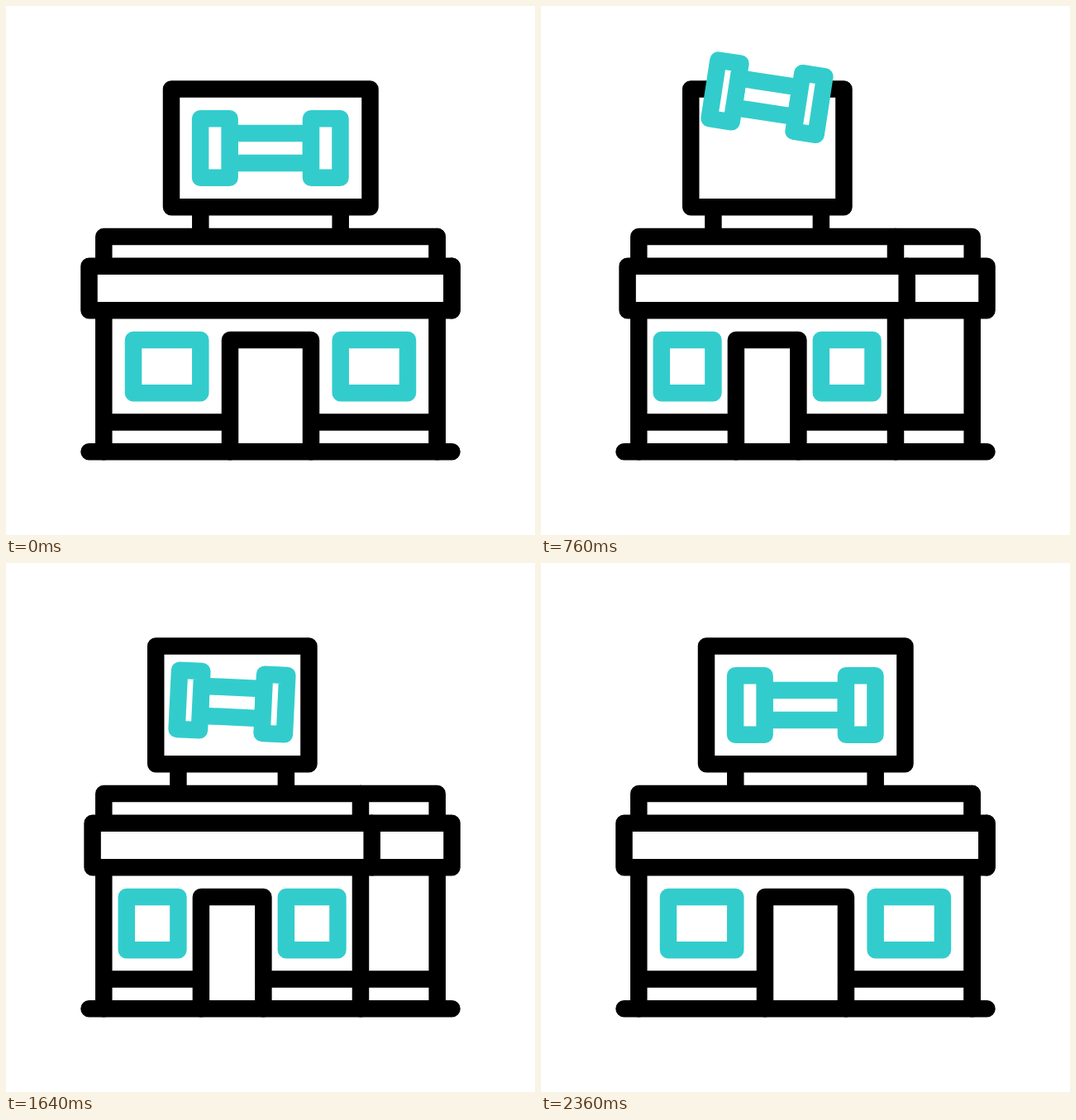
An HTML page for the animation above (2.4 s loop, 640 px wide and 640 px high).

```html
<!DOCTYPE html>
<html lang="en">
<head>
<meta charset="utf-8">
<title>Gym building</title>
<style>
  html, body { margin: 0; width: 100%; height: 100%; overflow: hidden; background: #fff; }
  svg { display: block; width: 100%; height: 100%; }
  path { fill: none; stroke-width: 20.5; stroke-linecap: round; stroke-linejoin: round; }
  #side, #front { stroke: #000; }
  #glass, #bell path { stroke: #3cc; }
  #bell path { fill: #fff; }
</style>
</head>
<body>
<svg viewBox="0 0 640 640">
  <path id="side"/>
  <path id="front"/>
  <path id="glass"/>
  <g id="bell"><path id="bars"/><path id="plates"/></g>
</svg>
<script>
const LOOP = 2400, PIVOT = 118.3, SQUASH = 0.2655, CENTER = 319.8;
const ROOF = 279, TOP = 314.7, LOW = 368.2, BASE = 503.6, GROUND = 539.3;

// [time, value]
const height = [[0, 172], [420, 181], [480, 176.5], [760, 110.7], [1040, 195],
  [1330, 132], [1640, 168.5], [1780, 178], [2040, 174.5], [2240, 172], [2400, 172]];
const tilt = [[0, 0], [445, -15.2], [480, -15], [745, 8.8], [760, 8.7],
  [1080, 4.06], [1640, 2.75], [2000, 0], [2400, 0]];

const el = id => document.getElementById(id);
const draw = (id, ...parts) => el(id).setAttribute('d', parts.join(''));
const line = (...p) => 'M' + p.map(n => n.toFixed(2)).join(' ');
const box = (x1, y1, x2, y2) => line(x1, y1, x2, y1, x2, y2, x1, y2) + 'Z';

// Smooth curve through the keys without overshoot
function curve(keys, t) {
  const slope = i => keys[i + 1] && keys[i]
    ? (keys[i + 1][1] - keys[i][1]) / (keys[i + 1][0] - keys[i][0]) : 0;
  const tangent = i => {
    const a = slope(i - 1), b = slope(i);
    return a * b > 0 ? 2 * a * b / (a + b) : 0;
  };
  let i = 0;
  while (i < keys.length - 2 && t >= keys[i + 1][0]) i++;
  const [t0, v0] = keys[i], [t1, v1] = keys[i + 1];
  const d = t1 - t0, k = (t - t0) / d, q = 1 - k;
  return v0 * (1 + 2 * k) * q * q + v1 * k * k * (3 - 2 * k)
    + d * (tangent(i) * k * q * q - tangent(i + 1) * k * k * q);
}

// cubic-bezier(.81, 0, .19, 1)
function ease(x) {
  let a = 0, b = 1;
  for (let i = 0; i < 24; i++) {
    const m = (a + b) / 2, q = 1 - m;
    if (2.43 * m * q * q + 0.57 * m * m * q + m * m * m < x) a = m; else b = m;
  }
  return a * a * (3 - 2 * a);
}

function render(t) {
  const scale = 1 - SQUASH * ease(1 - Math.abs(t / 1200 - 1));
  const X = x => PIVOT + (x - PIVOT) * scale;
  const wall = X(521.7), eave = X(539.5), doorL = X(271), doorR = X(369);

  draw('side',
    line(wall, ROOF, 521.7, ROOF, 521.7, TOP),
    line(eave, TOP, 539.5, TOP, 539.5, LOW, eave, LOW),
    line(521.7, LOW, 521.7, GROUND),
    line(wall, BASE, 521.7, BASE),
    line(100.5, GROUND, 539.5, GROUND));

  draw('front',
    box(X(200), 100.5, X(440.5), 243.2),
    line(X(235.3), 243.2, X(235.3), ROOF),
    line(X(404.7), 243.2, X(404.7), ROOF),
    line(PIVOT, TOP, PIVOT, ROOF, wall, ROOF, wall, TOP),
    box(X(100.5), TOP, eave, LOW),
    line(PIVOT, LOW, PIVOT, GROUND),
    line(wall, LOW, wall, GROUND),
    line(PIVOT, BASE, doorL, BASE),
    line(doorR, BASE, wall, BASE),
    line(doorL, GROUND, doorL, 404, doorR, 404, doorR, GROUND));

  draw('glass',
    box(X(154), 404, X(235.3), 468.2),
    box(X(404.7), 404, X(486), 468.2));

  const inner = 49.2 * scale, outer = 84.7 * scale;
  draw('bars', box(-inner, -18, inner, 18));
  draw('plates', box(-outer, -35.7, -inner, 35.7), box(inner, -35.7, outer, 35.7));
  el('bell').setAttribute('transform',
    `translate(${X(CENTER)} ${curve(height, t)}) rotate(${curve(tilt, t)})`);
}

let start;
function tick(now) {
  start ??= now;
  render((now - start) % LOOP);
  requestAnimationFrame(tick);
}
render(0);
requestAnimationFrame(tick);
</script>
</body>
</html>
```
